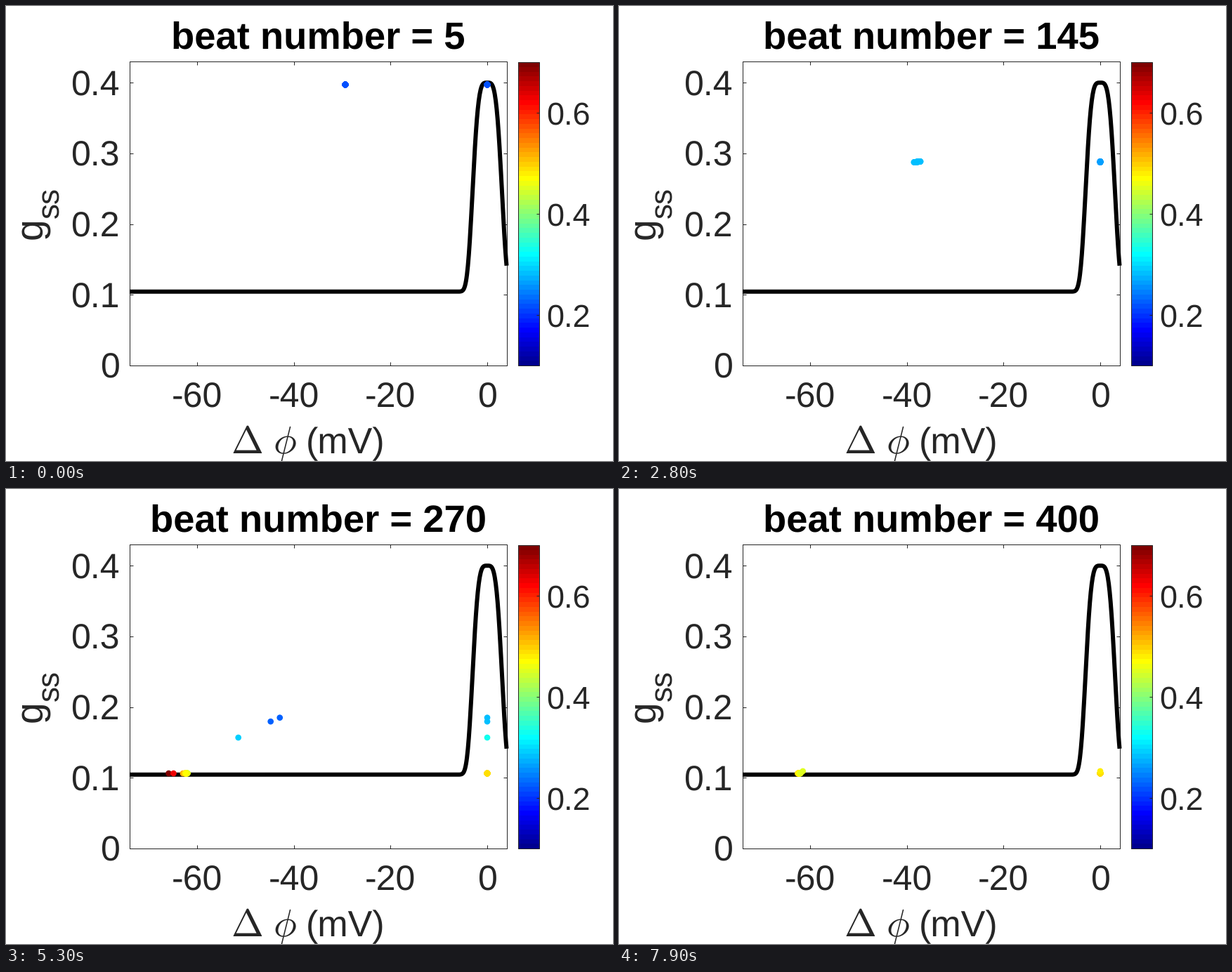
Write a matplotlib script that moves like this. It is 864x648 px and loops after 8000 ms.

```python
import numpy as np
import matplotlib.pyplot as plt
from matplotlib.animation import FuncAnimation

W, H = 864, 648
FRAMES, INTERVAL, STEP = 80, 100, 5
GREY = "#262626"
LEFT, RIGHT, TOP, BOTTOM = 176, 712.5, 79, 512

plt.rcParams.update({
    "font.family": "Liberation Sans",
    "mathtext.fontset": "cm",
    "text.hinting": "none",
})

fig = plt.figure(figsize=(W / 72, H / 72), dpi=72, facecolor="white")
ax = fig.add_axes([0, 0, 1, 1])


def px(v):
    return 685 + 6.88 * v


def py(g):
    return 512 - 1007 * g


def jet(v):
    """64-level jet colours over the range 0.1 to 0.7."""
    level = np.clip(np.floor((np.asarray(v) - 0.1) / 0.6 * 64), 0, 63)
    t = (level + 1) / 64
    return np.stack([np.clip(1.5 - abs(4 * t - c), 0, 1) for c in (3, 2, 1)], -1)


def label(x, y, s, size, ha="center", color=GREY, **kw):
    return ax.text(x, y, s, fontsize=size, ha=ha, va="baseline", color=color, **kw)


def line(xs, ys):
    ax.plot(xs, ys, color=GREY, lw=1, zorder=2, solid_capstyle="butt")


def box(x0, x1, y0, y1):
    line([x0, x1, x1, x0, x0], [y0, y0, y1, y1, y0])


# Colour bar
ax.imshow(jet(0.1 + 0.6 * (np.arange(64) + 0.5) / 64)[:, None, :],
          extent=(729, 759, 512, 80), origin="lower", aspect="auto",
          interpolation="nearest")
box(729, 759, 80, 512)
for v in (0.2, 0.4, 0.6):
    y = 512 - 720 * (v - 0.1)
    line([755, 759], [y, y])
    label(769, y + 17, f"{v:.1f}", 45, "left")

# Axes
box(LEFT, RIGHT, TOP, BOTTOM)
for v in range(-60, 1, 20):
    x = px(v)
    line([x, x], [BOTTOM, BOTTOM - 5])
    line([x, x], [TOP, TOP + 5])
    label(x, 572, str(v), 50)
for i in range(5):
    y = py(i / 10)
    line([LEFT, LEFT + 5], [y, y])
    line([RIGHT, RIGHT - 5], [y, y])
    label(162, y + 18, f"{i / 10:g}", 50, "right")

label(319.5, 637, r"$\Delta$", 55, "left")
label(380, 637, r"$\phi$", 55, "left")
label(426.5, 637, "(mV)", 52, "left")
side = dict(rotation=90, rotation_mode="anchor")
label(50, 332, "g", 55, "left", **side)
label(75, 302, "ss", 44, "left", **side)
title = label(444.5, 60, "", 54.4, color="black", weight="bold")

# Steady-state curve
v = np.linspace(-74, 4, 800)
ax.plot(px(v), py(0.1045 + 0.2955 * np.exp(-(abs(v) / 3.3) ** 3.82)),
        color="black", lw=6, zorder=3, solid_capstyle="butt")

# Cells run from the right end of the cluster (rank 1) to the left (rank -1)
N = 46
RANK = np.linspace(1, -1, N)
rng = np.random.default_rng(4)
SPREAD = 390 - 159 * ((1 - RANK) / 2) ** 0.8 + rng.uniform(-1, 1, N) * (1 - RANK ** 2)
REST = rng.uniform(254.5, 258.5, N)
# The two end cells take longest to come to rest
DURATION = 30 + (99 + 38 * RANK) * abs(RANK) ** 24

KEYS = [5, 90, 145, 190]
FIT_X = np.polyfit(KEYS, [483, 456, 424.5, 371.5], 3)
FIT_Y = np.polyfit(KEYS, [112, 174, 222, 283], 3)


def cluster(b):
    """Rows: x, y, colour value on the left, colour value at zero."""
    t = (b - 5) / 185
    return np.array([
        np.polyval(FIT_X, b) + 5.8 * t ** 0.8 * RANK,
        np.polyval(FIT_Y, b) - 2.8 * t ** 6 * RANK,
        np.full(N, 0.22 + 0.082 * t ** 1.2),
        np.full(N, 0.213 + 0.074 * t ** 1.5),
    ])


def on_track(x):
    """Same rows for cells on the curved path down to the flat line."""
    rise = 150 * (1 - np.exp(-np.maximum(x - 258, 0) / 175))
    left = 0.21 + 0.285 / (1 + np.exp((x - 308) / 27)) + 0.008 * np.maximum(258 - x, 0)
    right = 0.28 + 0.21 * np.clip(1 - rise / 80, 0, 1) ** 1.4
    return np.array([x, 405 - rise, left, right])


def cells(b):
    if b <= 190:
        return cluster(b)
    if b <= 235:
        w = ((b - 190) / 45) ** 1.5
        return (1 - w) * cluster(190) + w * on_track(SPREAD)
    t = np.minimum((b - 235) / DURATION, 1)
    return on_track(SPREAD + (REST - SPREAD) * t ** 4)


dots = ax.scatter([], [], s=75, linewidths=0, zorder=4)
ax.set_xlim(0, W)
ax.set_ylim(H, 0)
ax.axis("off")


def update(i):
    beat = STEP * (i + 1)
    title.set_text(f"beat number = {beat}")
    x, y, left, right = cells(beat)[:, ::-1]
    xs = np.concatenate([x, np.full(N, px(0))])
    dots.set_offsets(np.column_stack([xs, np.concatenate([y, y])]))
    dots.set_facecolor(jet(np.concatenate([left, right])))
    return title, dots


anim = FuncAnimation(fig, update, frames=FRAMES, interval=INTERVAL,
                     repeat=True, repeat_delay=0, blit=False)
plt.show()
```
